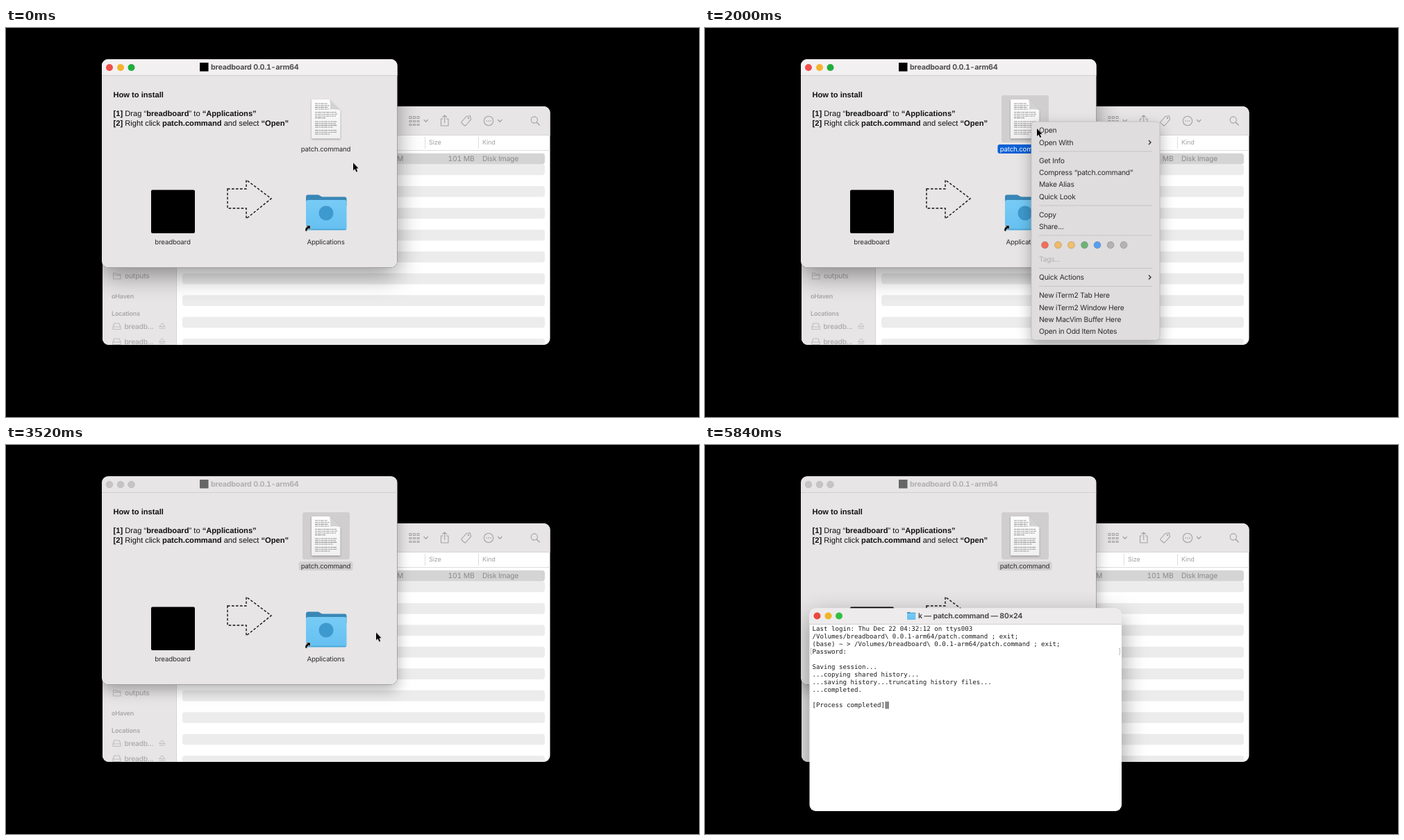
These frames come from a looping animation (998 px wide and 561 px high, 5.92 s). An HTML page:

```html
<!DOCTYPE html>
<html lang="en">
<head>
<meta charset="utf-8">
<title>Installing breadboard</title>
<style>
html, body { margin: 0; width: 100%; height: 100%; overflow: hidden; background: #000; }
svg { display: block; width: 100%; height: 100%; }
text { font: 9.7px Inter, sans-serif; letter-spacing: -.02em; fill: #2d2c2d; white-space: pre; text-rendering: geometricPrecision; }
.mid { text-anchor: middle; }
.title { font-size: 10.7px; font-weight: 700; font-variant-numeric: tabular-nums; fill: #4f4d4e; }
.term .title { font-size: 10.5px; }
.off .title { fill: #b1afb0; }
.note { font: 11.15px "Liberation Sans", Arial, sans-serif; letter-spacing: 0; fill: #111; }
.b { font-weight: 700; }
.side { font-size: 10.2px; font-weight: 500; fill: #aaa8a9; }
.head { font-size: 9px; font-weight: 600; fill: #a9a7a8; }
.row { font-size: 10.4px; font-variant-numeric: tabular-nums; fill: #8b898a; }
.item { font-size: 10.3px; }
.ask { font-size: 10.25px; font-weight: 700; fill: #1f1e1f; }
.small { font-size: 9.1px; }
.dim { fill: #a3a1a2; }
.mono { font: 9.15px "DejaVu Sans Mono", monospace; letter-spacing: 0; fill: #1c1c1c; }
.white { fill: #fff; }
.icon { fill: none; stroke: #a5a3a4; stroke-width: 1.1; stroke-linecap: round; stroke-linejoin: round; }
.faint { stroke: #bfbdbe; }
.cast { filter: drop-shadow(0 8px 10px rgba(0,0,0,.3)); }
.far { filter: drop-shadow(0 12px 17px rgba(0,0,0,.4)); }

.a { visibility: hidden; animation: 5.92s step-end infinite; }
.active { animation-name: active; }
.off { animation-name: off; }
.picked { animation-name: picked; }
.blue { animation-name: blue; }
.menu { animation-name: menu; }
.hover { animation-name: hover; }
.dialog { animation-name: dialog; }
.term { animation-name: term; }
.cmd { animation-name: cmd; }
.pass { animation-name: pass; }
.sudo { animation-name: sudo; }
.plain { animation-name: plain; }
.key { animation-name: key; }
.wait { animation-name: wait; }
.saved { animation-name: saved; }
.done { animation-name: done; }
@keyframes active { 0% { visibility: visible } 41.891% { visibility: hidden } }
@keyframes off { 41.891%, 100% { visibility: visible } }
@keyframes picked { 18.918%, 100% { visibility: visible } }
@keyframes blue { 18.918% { visibility: visible } 41.891% { visibility: hidden } }
@keyframes menu { 20.27% { visibility: visible } 36.486% { visibility: hidden } }
@keyframes hover { 29.729% { visibility: visible } 33.783% { visibility: hidden } 35.135% { visibility: visible } 36.486% { visibility: hidden } }
@keyframes dialog { 41.891% { visibility: visible } 58.108% { visibility: hidden } }
@keyframes term { 63.513%, 100% { visibility: visible } }
@keyframes cmd { 68.918%, 100% { visibility: visible } }
@keyframes pass { 70.27%, 100% { visibility: visible } }
@keyframes sudo { 70.27% { visibility: visible } 82.432% { visibility: hidden } }
@keyframes plain { 63.513% { visibility: visible } 70.27% { visibility: hidden } 82.432%, 100% { visibility: visible } }
@keyframes key { 70.27% { visibility: visible } 79.729% { visibility: hidden } }
@keyframes wait { 79.729% { visibility: visible } 82.432% { visibility: hidden } }
@keyframes saved { 82.432%, 100% { visibility: visible } }
@keyframes done { 85.135%, 100% { visibility: visible } }

.pointer { animation: move 5.92s steps(5) infinite, hide 5.92s step-end infinite; }
@keyframes move {
  0%, 1.351% { transform: translate(500px, 194.5px) }
  8.108%, 9.459% { transform: translate(494px, 183px) }
  16.216% { transform: translate(469px, 138px) }
  22.972% { transform: translate(469px, 138px); animation-timing-function: steps(8) }
  33.783% { transform: translate(478px, 145px) }
  36.486% { transform: translate(478px, 145px); animation-timing-function: steps(8) }
  47.297% { transform: translate(622.5px, 286px); animation-timing-function: steps(7) }
  56.756% { transform: translate(528px, 272px); animation-timing-function: steps(2) }
  59.459%, 100% { transform: translate(533px, 270.5px) }
}
@keyframes hide { 0% { visibility: visible } 63.513%, 100% { visibility: hidden } }
</style>
</head>
<body>
<svg viewBox="0 0 998 561">
<defs>
  <clipPath id="finder"><rect x="139" y="113" width="644.5" height="344" rx="9"/></clipPath>
  <pattern id="stripes" x="254" y="196.5" width="522" height="31.45" patternUnits="userSpaceOnUse">
    <rect width="522" height="15.7" rx="4" fill="#ececec"/>
  </pattern>
  <linearGradient id="paper" x2="0" y2="1"><stop stop-color="#fdfdfd"/><stop offset="1" stop-color="#f0f0f0"/></linearGradient>
  <linearGradient id="front" x2="0" y2="1"><stop stop-color="#78cbf6"/><stop offset="1" stop-color="#64c0f1"/></linearGradient>
  <linearGradient id="glass" x2="0" y2="1">
    <stop stop-color="#a19fa0"/><stop offset=".14" stop-color="#b0aeaf"/><stop offset=".34" stop-color="#d3d1d2"/><stop offset="1" stop-color="#dbd9da"/>
  </linearGradient>
  <radialGradient id="shade" cx=".85" cy=".14" r=".42"><stop stop-color="#6e6e6e" stop-opacity=".65"/><stop offset="1" stop-color="#777" stop-opacity="0"/></radialGradient>
  <radialGradient id="glow" cx="0" cy=".5" r="1"><stop stop-color="#c3e8f4"/><stop offset="1" stop-color="#d6e4e8" stop-opacity="0"/></radialGradient>
  <linearGradient id="sign" x2="0" y2="1"><stop stop-color="#f8c92f"/><stop offset="1" stop-color="#eaa812"/></linearGradient>
  <g id="folder">
    <path d="M0 3a3 3 0 0 1 3-3h14c3 0 4 3 7 3h31.5a3 3 0 0 1 3 3v10H0z" fill="#3987b6"/>
    <rect y="7.5" width="58.5" height="43.5" rx="3" fill="url(#front)"/>
    <path d="M1 50h56.5" stroke="#4aa3d3" stroke-width="1.5"/>
  </g>
  <g id="drive" class="icon faint">
    <path d="M0 5l2-5h7l2 5v3.5H0zM0 5h11"/>
    <path d="M67 4.5h8l-4-4.500zM67 7h8" stroke-width="1"/>
  </g>
</defs>

<!-- disk image list behind -->
<g clip-path="url(#finder)">
  <rect x="139" y="113" width="645" height="344" fill="#fff"/>
  <path d="M139 113h645v42H245v302H139z" fill="#e7e5e6"/>
  <path d="M245.5 155v302M245 154.500h539" stroke="#d6d4d5" fill="none"/>
  <path d="M245 176.500h539M603.5 157v17M680.5 157v17" stroke="#dedddd" fill="none"/>
  <rect x="254" y="196.5" width="522" height="262" fill="url(#stripes)"/>
  <rect x="254" y="180.8" width="522" height="15.7" rx="4" fill="#d5d4d5"/>
  <g class="icon">
    <path d="M581 127.500h3v3h-3zM586.5 127.500h3v3h-3zM592 127.500h3v3h-3zM581 133.500h3v2h-3zM586.5 133.500h3v2h-3zM592 133.500h3v2h-3zM581 138.500h3v2h-3zM586.5 138.500h3v2h-3zM592 138.500h3v2h-3z"/>
    <path d="M602 132.500l2.700 2.700 2.700-2.700M708.5 132.500l2.700 2.700 2.700-2.700" stroke-width="1.4"/>
    <path d="M629 131h-2.500v10h10.500v-10h-2.500M631.7 136.500v-10.500M628.9 128.500l2.800-2.700 2.800 2.700"/>
    <path d="M656 135.500l7-8 5.500-.8 1 5.500-7.500 8.300q-1 .8-2 0l-4-3.700q-.6-.7 0-1.300z"/>
    <circle cx="666" cy="130" r=".6"/>
    <circle cx="695" cy="134" r="6.7"/>
    <path d="M692 134h.01M695 134h.01M698 134h.01" stroke-width="1.7"/>
    <circle cx="760.8" cy="132.5" r="4.6"/><path d="M764.2 136l4 4" stroke-width="1.4"/>
    <path class="faint" d="M154.5 353.500h4l1.300 1.500h5.200v7h-10.500zM154.5 356.500h10.500"/>
  </g>
  <text class="small dim" x="609" y="168" font-weight="500">Size</text>
  <text class="small dim" x="686" y="168" font-weight="500">Kind</text>
  <text class="row" x="563" y="192">M</text>
  <text class="row" x="674.5" y="192" text-anchor="end">101 MB</text>
  <text class="row" x="686" y="192">Disk Image</text>
  <text class="side" x="171" y="361">outputs</text>
  <text class="head" x="152" y="389.5">oHaven</text>
  <text class="head" x="152" y="414.5">Locations</text>
  <text class="side" x="170.5" y="433.5">breadb...</text>
  <text class="side" x="170.5" y="455.5">breadb...</text>
  <use href="#drive" x="154" y="426"/>
  <use href="#drive" x="154" y="448"/>
</g>

<!-- installer window -->
<rect class="a active far" x="138" y="45" width="425.5" height="300.5" rx="9"/>
<rect class="a off cast" x="138" y="45" width="425.5" height="300.5" rx="9"/>
<rect x="138" y="45" width="425.5" height="300.5" rx="9" fill="#e7e5e6"/>
<g class="a active">
  <path d="M138 68V54a9 9 0 0 1 9-9h407.500a9 9 0 0 1 9 9v14z" fill="#f3f0f2"/>
  <circle cx="149" cy="57" r="5" fill="#ee4f49"/>
  <circle cx="165" cy="57" r="5" fill="#f4b32c"/>
  <circle cx="180.5" cy="57" r="5" fill="#20ad3c"/>
  <rect x="279" y="50" width="12.5" height="12.5"/>
  <text class="title" x="295" y="60">breadboard 0.0.1-arm64</text>
</g>
<g class="a off">
  <g fill="#c6c4c5" stroke="#b5b3b4" stroke-width=".6"><circle cx="149" cy="57" r="4.8"/><circle cx="165" cy="57" r="4.8"/><circle cx="180.5" cy="57" r="4.8"/></g>
  <rect x="279" y="50" width="12.5" height="12.5" fill="#666"/>
  <text class="title" x="295" y="60">breadboard 0.0.1-arm64</text>
</g>
<path d="M138 68.500h425.500" stroke="#d0cecf"/>
<text class="note b" x="154.5" y="100">How to install</text>
<text class="note" x="154.5" y="127"><tspan class="b">[1]</tspan> Drag “<tspan class="b">breadboard</tspan>” to <tspan class="b">“Applications”</tspan></text>
<text class="note" x="154.5" y="140.5"><tspan class="b">[2]</tspan> Right click <tspan class="b">patch.command</tspan> and select <tspan class="b">“Open”</tspan></text>

<rect class="a picked" x="427" y="97" width="68" height="68" rx="3" fill="#d0cecf"/>
<path d="M440 103h26l15.500 15.500v41H440z" fill="url(#paper)" style="filter:drop-shadow(0 1px 1px rgba(0,0,0,.35))"/>
<path d="M466 103q2 9 .5 14.500 8-1 15 1z" fill="#d3d2d2"/>
<g fill="none" stroke="#777" stroke-width="1.1" opacity=".75">
  <path d="M445 109h18M445 111.700h21M445 114.400h19M445 117h20" stroke-dasharray="4 .7 2.5 .6 5 .8"/>
  <path d="M445 121.500h31M445 124.200h32M445 127h30M445 129.600h15" stroke-dasharray="3 .7 5 .8 2 .6"/>
  <path d="M445 135h32M445 137.700h30M445 140.400h32M445 143h26M445 147.500h31M445 150.200h32M445 153h22" stroke-dasharray="5 .8 2.5 .7 3.5 .6"/>
</g>
<rect class="a off" x="421.5" y="168" width="78" height="13" rx="3" fill="#d3d1d2"/>
<text class="mid" x="460.5" y="178">patch.command</text>
<g class="a blue">
  <rect x="421.5" y="168" width="78.5" height="13" rx="3" fill="#0a60d6"/>
  <text class="mid white" x="460.5" y="178">patch.command</text>
</g>

<path d="M319 232h27v-13l36 27-36 29v-15h-27z" fill="none" stroke="#111" stroke-width="1.4" stroke-dasharray="3.6 2.4"/>
<rect x="209" y="233.5" width="63" height="62.5" rx="2"/>
<text class="mid" x="240" y="312">breadboard</text>
<use href="#folder" x="432" y="240.5"/>
<circle cx="461" cy="267" r="10.5" fill="#3e99ce"/>
<path d="M431 293q-1-5 3-6.500l-1.500-1.700h5.800v6l-1.900-1.900q-2.800 1-2.900 4.300z" fill="#111" stroke="#fff" stroke-width=".5"/>
<text class="mid" x="460.5" y="312">Applications</text>

<!-- context menu -->
<g class="a menu">
  <rect class="cast" x="470" y="135" width="185" height="315" rx="5" fill="#dfddde" stroke="#bdbbbc" stroke-width=".8"/>
  <path d="M481 178h163M481 256h163M481 299h163M481 346.500h163M481 372.500h163" stroke="#c6c4c5"/>
  <text class="item" x="481" y="151">Open</text>
  <text class="item" x="481" y="168.5">Open With</text>
  <text class="item" x="481" y="194.5">Get Info</text>
  <text class="item" x="481" y="212">Compress “patch.command”</text>
  <text class="item" x="481" y="229.3">Make Alias</text>
  <text class="item" x="481" y="246.6">Quick Look</text>
  <text class="item" x="481" y="272.5">Copy</text>
  <text class="item" x="481" y="290">Share...</text>
  <text class="item" x="481" y="336.5" style="fill:#b0aeaf">Tags...</text>
  <text class="item" x="481" y="363">Quick Actions</text>
  <text class="item" x="481" y="389">New iTerm2 Tab Here</text>
  <text class="item" x="481" y="406.5">New iTerm2 Window Here</text>
  <text class="item" x="481" y="424">New MacVim Buffer Here</text>
  <text class="item" x="481" y="441">Open in Odd Item Notes</text>
  <path d="M639 162l3 3-3 3M639 356.500l3 3-3 3" fill="none" stroke="#333" stroke-width="1.4"/>
  <g stroke="#000" stroke-opacity=".2" stroke-width=".8">
    <circle cx="489.5" cy="313" r="5" fill="#ef6f5a"/>
    <circle cx="508.5" cy="313" r="5" fill="#efba66"/>
    <circle cx="527.5" cy="313" r="5" fill="#efbf6c"/>
    <circle cx="546.5" cy="313" r="5" fill="#6fb277"/>
    <circle cx="565" cy="313" r="5" fill="#589eee"/>
    <circle cx="584" cy="313" r="5" fill="#b4b2b3"/>
    <circle cx="603" cy="313" r="5" fill="#b4b2b3"/>
  </g>
  <g class="a hover">
    <rect x="475" y="139" width="175" height="17.5" rx="4" fill="#2f7bf0"/>
    <text class="item white" x="481" y="151">Open</text>
  </g>
</g>

<!-- security question -->
<g class="a dialog">
  <rect class="far" x="462" y="12" width="205" height="285" rx="9" fill="url(#glass)"/>
  <rect x="462" y="12" width="205" height="285" rx="9" fill="url(#shade)"/>
  <path d="M462 240h38v57h-29a9 9 0 0 1-9-9z" fill="url(#glow)"/>
  <rect x="462.4" y="12.4" width="204.2" height="284.2" rx="9" fill="none" stroke="#bab8b9" stroke-width=".8"/>
  <path d="M564.5 34.500l21 37h-42z" fill="#f4f1ea" stroke="#f4f1ea" stroke-width="5.5" stroke-linejoin="round" style="filter:drop-shadow(0 1px 1px rgba(0,0,0,.4))"/>
  <path d="M564.5 35.500l19.500 35.500h-39z" fill="url(#sign)" stroke="#edb01b" stroke-width="3" stroke-linejoin="round"/>
  <path d="M562.5 43.500h4l-.8 14.500h-2.400z" fill="#fff" stroke="#fff" stroke-linejoin="round"/>
  <circle cx="564.5" cy="63.5" r="2.3" fill="#fff"/>
  <circle cx="646.5" cy="32.5" r="8" fill="#6b696a"/>
  <text class="ask mid" x="646.5" y="36.5" style="font-size:11.5px">?</text>
  <text class="ask mid" x="564.5" y="104">tavOS cannot verify the</text>
  <text class="ask mid" x="564.5" y="117">developer of “patch.command”.</text>
  <text class="ask mid" x="564.5" y="129.5">Are you sure you want to open it?</text>
  <text class="small mid" x="564.5" y="148.5">By opening this app, you will be</text>
  <text class="small mid" x="564.5" y="159.5">overriding system security which can</text>
  <text class="small mid" x="564.5" y="170.5">expose your computer and personal</text>
  <text class="small mid" x="564.5" y="181.5">information to malware that may harm</text>
  <text class="small mid" x="564.5" y="192.5">your Tav or compromise your privacy.</text>
  <text class="small mid dim" x="564.5" y="214.5">This item is on the disk image</text>
  <text class="small mid dim" x="564.5" y="225.5">“breadboard-0.0.1-arm64.dmg”. Brave</text>
  <text class="small mid dim" x="564.5" y="236.5">downloaded this disk image yesterday at</text>
  <text class="small mid dim" x="564.5" y="247.5">11:50 PM.</text>
  <rect x="474.5" y="262.5" width="86.5" height="22" rx="5" fill="#bfbdbe"/>
  <rect x="567.5" y="262.5" width="86.5" height="22" rx="5" fill="#0f7cfb"/>
  <text class="item mid" x="517.5" y="277">Open</text>
  <text class="item mid white" x="610.5" y="277" style="font-weight:600">Cancel</text>
</g>

<!-- terminal -->
<g class="a term">
  <rect class="far" x="150.5" y="235.5" width="449.5" height="292.5" rx="9" fill="#fff"/>
  <path d="M150.5 258v-13.500a9 9 0 0 1 9-9h431.500a9 9 0 0 1 9 9V258z" fill="#eeebec"/>
  <path d="M150.5 258.500h449.500" stroke="#d2d0d1"/>
  <circle cx="161.5" cy="246.5" r="5" fill="#e8493f"/>
  <circle cx="177.5" cy="246.5" r="5" fill="#efb426"/>
  <circle cx="193" cy="246.5" r="5" fill="#33bf40"/>
  <g class="a sudo">
    <circle cx="161.5" cy="246.5" r="1.5" fill="#7d1410"/>
    <use href="#folder" transform="translate(225 241) scale(.21)" opacity=".65"/>
    <text class="title" x="240" y="250" style="font-family:Inter,'DejaVu Sans',sans-serif">k — patch.command — sudo ◂ patch.command — 80×24</text>
  </g>
  <g class="a plain">
    <use href="#folder" transform="translate(291 241) scale(.21)"/>
    <text class="title" x="307" y="250">k — patch.command — 80×24</text>
  </g>
  <text class="mono" x="154.5" y="268">Last login: Thu Dec 22 04:32:12 on ttys003</text>
  <g class="a cmd">
    <text class="mono" x="154.5" y="279">/Volumes/breadboard\ 0.0.1-arm64/patch.command ; exit;</text>
    <text class="mono" x="154.5" y="290">(base) ~ &gt; /Volumes/breadboard\ 0.0.1-arm64/patch.command ; exit;</text>
  </g>
  <text class="mono a pass" x="154.5" y="301">Password:</text>
  <g class="a key">
    <rect x="204" y="292.5" width="9" height="10.5" fill="#8d8d8d"/>
    <circle cx="208.5" cy="296" r="2" fill="#fff"/>
    <path d="M208.5 297v5M209 300.500h1.300" stroke="#fff" stroke-width="1.3"/>
  </g>
  <rect class="a wait" x="154.5" y="303.5" width="5.5" height="10.5" fill="#8d8d8d"/>
  <g class="a saved">
    <path d="M154 293.500h-1.500v8.500h1.500M596 293.500h1.500v8.500h-1.500" fill="none" stroke="#b5b5b5" stroke-width=".9"/>
    <text class="mono" x="154.5" y="323">Saving session...</text>
    <text class="mono" x="154.5" y="334">...copying shared history...</text>
    <text class="mono" x="154.5" y="345">...saving history...truncating history files...</text>
    <text class="mono" x="154.5" y="356">...completed.</text>
  </g>
  <g class="a done">
    <text class="mono" x="154.5" y="378">[Process completed]</text>
    <rect x="259.3" y="370" width="5.7" height="10.5" fill="#8a8a8a"/>
  </g>
</g>

<g class="pointer">
  <path d="M0 0v11l2.500-2.200 1.900 4.200 1.900-.8-1.900-4.200h3.300z" fill="#000" stroke="#fff" stroke-width=".8" stroke-linejoin="round" paint-order="stroke"/>
</g>
</svg>
</body>
</html>
```
